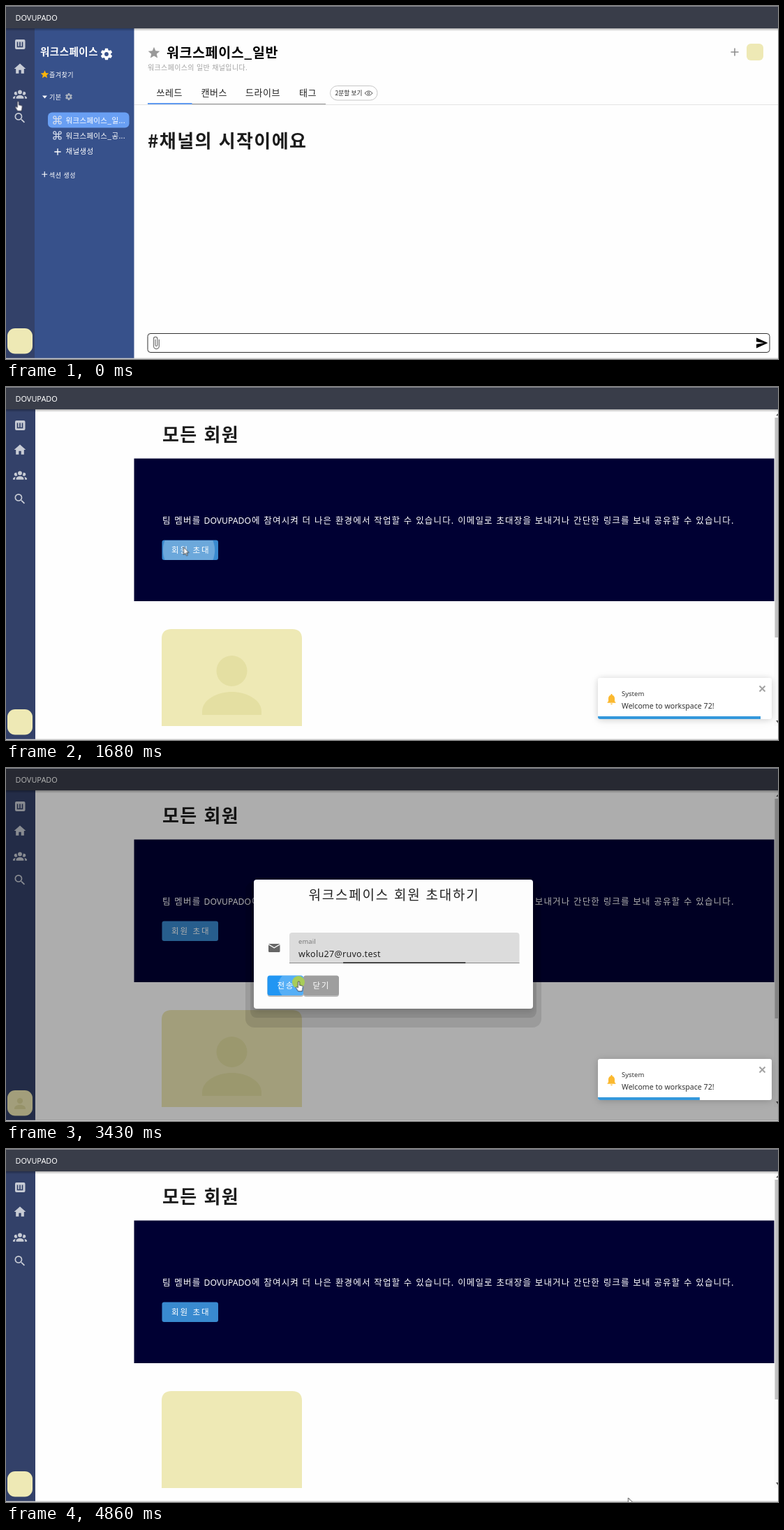
An HTML page that plays this animation: 1106x506 px, repeating every 4910 ms.

```html
<!DOCTYPE html>
<html lang="ko">
<head>
<meta charset="utf-8">
<title>Workspace invite</title>
<style>
html, body { margin: 0; width: 100%; height: 100%; overflow: hidden; background: #fff; }
#stage { position: relative; width: 1106px; height: 506px; overflow: hidden; background: #fefefe; }
#stage > * { position: absolute; }
svg { display: block; }
#stage > svg { left: 0; top: 0; }
text { font-family: "Noto Sans", "Noto Sans CJK KR", "Noto Sans CJK", sans-serif; white-space: pre; }
.ko { font-family: "Noto Sans CJK KR", "Noto Sans CJK", "Noto Sans", sans-serif; }
.b { font-weight: 700; }
.small { font-size: 9px; letter-spacing: .5px; fill: #fff; }
.channel { font-size: 10.5px; letter-spacing: .3px; fill: #fff; }
.tab { font-size: 13px; letter-spacing: .5px; fill: #222; }
.head { font-size: 26px; letter-spacing: 1.45px; fill: #1c1c1c; }
.body { font-size: 12.5px; letter-spacing: 1.16px; fill: #fff; }
.btn { font-size: 11.5px; letter-spacing: 1.6px; fill: #fff; }
#scrim { left: 0; top: 1px; width: 1106px; height: 504px; background: #000; }
#dialog {
  left: 355px; top: 160px; width: 400px; height: 185px; border-radius: 4px; background: #fdfdfd;
  box-shadow: 0 4px 8px rgba(0,0,0,.15), 0 8px 0 5px rgba(0,0,0,.1), 0 15px 0 12px rgba(0,0,0,.1);
}
#toast {
  left: 848px; top: 417px; width: 249px; height: 59px; border-radius: 3px; background: #fff; overflow: hidden;
  box-shadow: 0 1px 10px rgba(0,0,0,.14), 0 2px 15px rgba(0,0,0,.07);
}
.grow { transform-box: fill-box; transform-origin: center; }
#bar { transform-box: fill-box; transform-origin: left; }
</style>
</head>
<body>
<div id="stage">
<svg id="page" width="1106" height="506" viewBox="0 0 1106 506">
  <defs>
    <symbol id="home" viewBox="0 0 24 24"><path d="M10 20v-6h4v6h5v-8h3L12 3 2 12h3v8z"/></symbol>
    <symbol id="search" viewBox="0 0 24 24"><path d="M15.5 14h-.79l-.28-.27A6.47 6.47 0 0016 9.5 6.5 6.5 0 109.5 16c1.61 0 3.09-.59 4.23-1.57l.27.28v.79l5 4.99L20.49 19zm-6 0C7.01 14 5 11.99 5 9.5S7.01 5 9.5 5 14 7.01 14 9.5 11.99 14 9.5 14z"/></symbol>
    <symbol id="group" viewBox="0 0 24 24"><circle cx="12" cy="9" r="3.5"/><path d="M5 8c.56 0 1.08.15 1.53.42-.15 1.43.27 2.85 1.13 3.96A3 3 0 115 8m14 0a3 3 0 11-2.66 4.38 5.54 5.54 0 001.13-3.96C17.92 8.15 18.44 8 19 8M5.5 18.25c0-2.07 2.91-3.75 6.5-3.75s6.5 1.68 6.5 3.75V20h-13zM0 20v-1.5c0-1.39 1.89-2.56 4.45-2.9-.59.68-.95 1.62-.95 2.65V20zm24 0h-3.5v-1.75c0-1.03-.36-1.97-.95-2.65 2.56.34 4.45 1.51 4.45 2.9z"/></symbol>
    <symbol id="cog" viewBox="0 0 24 24"><path d="M12 15.5a3.5 3.5 0 110-7 3.5 3.5 0 010 7m7.43-2.53c.04-.32.07-.64.07-.97s-.03-.66-.07-1l2.11-1.63c.19-.15.24-.42.12-.64l-2-3.46c-.12-.22-.39-.31-.61-.22l-2.49 1c-.52-.39-1.06-.73-1.69-.98l-.37-2.65A.5.5 0 0014 2h-4c-.25 0-.46.18-.5.42l-.37 2.65c-.63.25-1.17.59-1.69.98l-2.49-1c-.22-.09-.49 0-.61.22l-2 3.46c-.13.22-.07.49.12.64L4.57 11c-.04.34-.07.67-.07 1s.03.65.07.97l-2.11 1.66c-.19.15-.25.42-.12.64l2 3.46c.12.22.39.3.61.22l2.49-1.01c.52.4 1.06.74 1.69.99l.37 2.65c.04.24.25.42.5.42h4c.25 0 .46-.18.5-.42l.37-2.65c.63-.26 1.17-.59 1.69-.99l2.49 1.01c.22.08.49 0 .61-.22l2-3.46c.12-.22.07-.49-.12-.64z"/></symbol>
    <symbol id="star" viewBox="0 0 24 24"><path d="M12 17.27L18.18 21l-1.64-7.03L22 9.24l-7.19-.61L12 2 9.19 8.63 2 9.24l5.46 4.73L5.82 21z"/></symbol>
    <symbol id="plus" viewBox="0 0 24 24"><path d="M19 13h-6v6h-2v-6H5v-2h6V5h2v6h6z"/></symbol>
    <symbol id="knot" viewBox="0 0 24 24"><path d="M9 9V6a3 3 0 10-3 3h12a3 3 0 10-3-3v12a3 3 0 103-3H6a3 3 0 103 3z" fill="none" stroke="#d3dbec" stroke-width="2"/></symbol>
    <symbol id="clip" viewBox="0 0 24 24"><path d="M16.5 6v11.5a4 4 0 01-8 0V5a2.5 2.5 0 015 0v10.5a1 1 0 01-2 0V6H10v9.5a2.5 2.5 0 005 0V5a4 4 0 00-8 0v12.5a5.5 5.5 0 0011 0V6z"/></symbol>
    <symbol id="person" viewBox="281 385 85 85"><circle cx="323.500" cy="407" r="22"/><path d="M281 470v-5c0-18 24-28 42.500-28s42.500 10 42.500 28v5z"/></symbol>
    <linearGradient id="fall" x2="0" y2="1"><stop stop-opacity=".3"/><stop offset="1" stop-opacity="0"/></linearGradient>
  </defs>

  <path d="M0 32h42v473H0z" fill="#334169"/>

  <g id="channelPage">
    <path d="M41 32h142.500v473H41z" fill="#37518b"/>
    <text class="ko b" x="49" y="71" font-size="14.500" letter-spacing=".5" fill="#fff">워크스페이스</text>
    <use href="#cog" x="134" y="59" width="20" height="20" fill="#fff"/>
    <use href="#star" x="48.500" y="91" width="14" height="14" fill="#fbb40a"/>
    <text class="ko small" x="62" y="101.500">즐겨찾기</text>
    <path d="M52 128.500h7l-3.500 4z" fill="#fff"/>
    <text class="ko small" x="62" y="133.500">기본</text>
    <use href="#cog" x="84" y="124" width="12" height="12" fill="#a9b0bd"/>
    <rect x="60" y="152.500" width="116.500" height="22" rx="6" fill="#699ff3"/>
    <use href="#knot" x="66" y="156" width="15" height="15"/>
    <use href="#knot" x="66" y="178" width="15" height="15"/>
    <text class="ko channel" x="85.500" y="167.500">워크스페이스_일...</text>
    <text class="ko channel" x="85.500" y="189.500">워크스페이스_공...</text>
    <use href="#plus" x="66" y="201" width="16" height="16" fill="#fff"/>
    <text class="ko channel" x="85.500" y="211.500">채널생성</text>
    <use href="#plus" x="48.500" y="234.500" width="13.500" height="13.500" fill="#fff"/>
    <text class="ko small" x="62" y="245.500">섹션 생성</text>

    <use href="#star" x="202" y="57" width="20" height="20" fill="#999"/>
    <text class="ko b" x="230" y="73.500" font-size="19.500" letter-spacing=".6">워크스페이스_일반</text>
    <text class="ko" x="203" y="92" font-size="10" letter-spacing=".35" fill="#a3a3a3">워크스페이스의 일반 채널입니다.</text>
    <use href="#plus" x="1034.500" y="56.500" width="19" height="19" fill="#8e8e8e"/>
    <rect x="1061" y="54" width="24" height="24" rx="6" fill="#eee9b5"/>
    <path d="M184 141.500h922" stroke="#e4e4e4"/>
    <path d="M266 140.500h192" stroke="#8d8d8d"/>
    <path d="M203 140h63.500" stroke="#5f9af0" stroke-width="2"/>
    <text class="ko tab" x="215.500" y="129">쓰레드</text>
    <text class="ko tab" x="279.500" y="129">캔버스</text>
    <text class="ko tab" x="343" y="129">드라이브</text>
    <text class="ko tab" x="420" y="129">태그</text>
    <rect x="464.500" y="114.500" width="67.500" height="20.500" rx="10.200" fill="#fff" stroke="#c6c6c6"/>
    <text class="ko" x="471.500" y="127.500" font-size="8.600" fill="#222">2분할 보기</text>
    <g fill="none" stroke="#555"><path d="M514 125q5.500-6.500 11 0q-5.500 6.500-11 0z"/><circle cx="519.500" cy="125" r="1.500"/></g>
    <text class="ko b head" x="203" y="202.500">#채널의 시작이에요</text>
    <rect x="203" y="469.500" width="891" height="27" rx="4" fill="#fff" stroke="#333"/>
    <use href="#clip" x="205" y="473" width="20" height="20" fill="#777"/>
    <path d="M1075 490.500l16.500-7.500-16.500-7.500v5.800l11 1.700-11 1.700z"/>
  </g>

  <g id="memberPage">
    <text class="ko b head" x="224" y="78">모든 회원</text>
    <path d="M183.500 102.500h923V307h-923z" fill="#000033"/>
    <text class="ko body" x="224" y="195.500">팀 멤버를</text>
    <text x="283.500" y="195.500" font-size="12.200" fill="#fff">DOVUPADO</text>
    <text class="ko body" x="352" y="195.500">에 참여시켜 더 나은 환경에서 작업할 수 있습니다. 이메일로 초대장을 보내거나 간단한 링크를 보내 공유할 수 있습니다.</text>
    <rect x="223.500" y="219.500" width="80.500" height="28.500" rx="3" fill="#398acf"/>
    <svg x="224" y="220" width="80" height="28" viewBox="224 220 80 28"><circle id="inviteRipple" class="grow" cx="262" cy="234" r="37" fill="#fff"/></svg>
    <text class="ko btn" x="237" y="238" style="letter-spacing:2px">회원 초대</text>
    <g id="members">
      <path d="M223 486V361q0-14 14-14h173q14 0 14 14v125z" fill="#eee9b5"/>
      <use id="cardPerson" href="#person" x="281" y="385" width="85" height="85" fill="#e4dfa2"/>
      <path d="M1100.500 33h6v453h-6z" fill="#fafafa"/>
      <path d="M1101.500 44h5v315h-5z" fill="#c1c1c1"/>
      <path d="M1103 41l3-3v3zM1103 478h3v4z" fill="#555"/>
    </g>
  </g>

  <g id="railIcons" fill="#c8ccd5">
    <rect x="13" y="48" width="14.500" height="14" rx="2"/>
    <path d="M16.500 51.500v7h7v-7M20 51.500v7" fill="none" stroke="#334169" stroke-width="1.700"/>
    <use href="#home" x="10" y="80" width="20" height="20"/>
    <use href="#group" x="10" y="116" width="20" height="20"/>
    <use href="#search" x="10" y="150.500" width="20" height="20"/>
  </g>
  <circle id="railRipple" class="grow" cx="20" cy="126" r="16" fill="#fff"/>
  <rect x="2" y="462" width="36" height="36.500" rx="11" fill="#eee9b5"/>
  <use id="railPerson" href="#person" x="12" y="473" width="16" height="16" fill="#ddd79a"/>
  <path d="M0 0h1106v32H0z" fill="#393d49"/>
  <path d="M0 .5h1106" stroke="#83858c"/>
  <path d="M0 32h1106v4H0z" fill="url(#fall)"/>
  <text x="13.500" y="21" font-size="10.900" font-weight="500" fill="#fff">DOVUPADO</text>
  <path d="M0 505.200h1106" stroke="#b5b5b5"/>
</svg>

<div id="scrim"></div>

<div id="dialog"><svg width="400" height="185" viewBox="355 160 400 185">
  <text class="ko" x="433.500" y="189" font-size="19" letter-spacing="1.750" fill="#222">워크스페이스 회원 초대하기</text>
  <path d="M392.500 253.500v9q0 1.500-1.500 1.500h-13.500q-1.500 0-1.500-1.500v-9l8.200 5zM376 252h16.500l-8.300 5z" fill="#666"/>
  <path d="M406 280v-40q0-4 4-4h321.500q4 0 4 4v40z" fill-opacity=".03"/>
  <path id="focusFill" d="M406 280v-40q0-4 4-4h321.500q4 0 4 4v40z" fill-opacity=".1"/>
  <path d="M406 279.500h329.500" stroke="#888"/>
  <path id="focusLine" class="grow" d="M406 278.500h329.500v1.500H406z" fill="#111"/>
  <g id="label"><text font-size="12.500" letter-spacing=".2" fill="#777">email</text></g>
  <text id="address" x="419" y="271" font-size="12.500" letter-spacing=".3" fill="#222">wkolu27@ruvo.test</text>
  <g fill-opacity=".25"><rect x="374.500" y="299" width="52" height="29" rx="4"/><rect x="426" y="299" width="51" height="29" rx="4"/></g>
  <rect x="374.500" y="297.500" width="51.500" height="28.500" rx="3.500" fill="#2196f3"/>
  <rect x="426" y="297.500" width="51" height="28.500" rx="3.500" fill="#9e9e9e"/>
  <svg x="375" y="298" width="51" height="28" viewBox="375 298 51 28"><circle id="sendRipple" class="grow" cx="410" cy="312" r="40" fill="#fff"/></svg>
  <text class="ko btn" x="388.500" y="316">전송</text>
  <text class="ko btn" x="439.500" y="316">닫기</text>
</svg></div>

<div id="toast"><svg width="249" height="59" viewBox="848 417 249 59">
  <path d="M867.500 455a1.600 1.600 0 001.600-1.300h-3.200a1.600 1.600 0 001.600 1.300zm4.500-4.500v-4c0-2.300-1.200-4.200-3.300-4.700v-.5a1.200 1.200 0 00-2.400 0v.5c-2.100.5-3.300 2.400-3.300 4.700v4l-1.500 1.500v.8h12v-.8z" fill="#fbb930"/>
  <text x="882" y="443" font-size="9.500" fill="#333">System</text>
  <text x="882" y="461" font-size="10.600" fill="#333">Welcome to workspace 72!</text>
  <path d="M1079.500 428.500l8 8m0-8l-8 8" stroke="#a3a3a3" stroke-width="2"/>
  <rect id="bar" x="848" y="472" width="249" height="4" fill="#3498db"/>
</svg></div>

<svg width="1106" height="506" viewBox="0 0 1106 506">
  <circle id="clickDot" cx="419" cy="307" r="9" fill="#a8cc58"/>
  <g id="cursor">
    <path id="arrow" d="M0 0v11l2.500-2.300 1.700 3.600 1.600-.7-1.700-3.600h3.400z" fill="#fff" stroke="#222" stroke-width=".8"/>
    <path id="hand" d="M-1.200 1c0-1.500 2.200-1.500 2.200 0v4.300l3.400.8c1.200.3 1.600 1.100 1.400 2.300l-1 5.600H-1L-4 9.300c-.6-1.100.7-2 1.600-1.200l1.200 1z" fill="#fff" stroke="#223" stroke-width=".8"/>
  </g>
</svg>
</div>

<script>
const LOOP = 4910;

// Each key is [time in ms, value, easing to the next key]; a repeated time is a hard change.
function play(id, prop, keys) {
  const first = keys[0], last = keys[keys.length - 1];
  const all = [...keys];
  if (first[0] > 0) all.unshift([0, first[1]]);
  if (last[0] < LOOP) all.push([LOOP, last[1]]);
  const frames = all.map(([t, value, easing = 'linear']) => ({ offset: t / LOOP, [prop]: value, easing }));
  document.getElementById(id).animate(frames, { duration: LOOP, iterations: Infinity });
}

// Visible between pairs of times.
function show(id, ...spans) {
  const keys = [];
  for (const [from, to] of spans) {
    if (from > 0) keys.push([from, 0]);
    keys.push([from, 1], [to, 1]);
    if (to < LOOP) keys.push([to, 0]);
  }
  play(id, 'opacity', keys);
}

const move = (x, y, k = 1) => `translate(${x}px, ${y}px) scale(${k})`;
const path = pts => pts.map(([t, x, y, ease]) => [t, move(x, y), ease]);
const OUT = 'cubic-bezier(0,0,.2,1)', IN = 'cubic-bezier(.4,0,1,1)', BOUNCE = 'cubic-bezier(.215,.61,.355,1)';

show('channelPage', [0, 655]);
show('memberPage', [655, LOOP]);
show('railIcons', [0, 655], [760, LOOP]);
show('members', [900, LOOP]);
show('cardPerson', [1100, 4835]);
show('railPerson', [1755, 4835]);

play('railRipple', 'transform', [[260, 'scale(.2)', OUT], [400, 'scale(1)']]);
play('railRipple', 'opacity', [[255, 0], [260, .18], [400, .18], [510, 0]]);
play('inviteRipple', 'transform', [[1570, 'scale(.2)'], [1680, 'scale(1)'], [1740, 'scale(1.3)']]);
play('inviteRipple', 'opacity', [[1570, 0], [1575, .27], [1830, .25], [2060, 0]]);

play('scrim', 'opacity', [[1735, 0], [1900, .32], [4550, .32, 'cubic-bezier(.4,0,.2,1)'], [4835, 0]]);
play('dialog', 'opacity', [[1735, 0, OUT], [1950, 1], [4550, 1, IN], [4675, 0]]);
play('dialog', 'transform', [[1735, 'scale(.9)', OUT], [1950, 'scale(1)'], [4550, 'scale(1)', IN], [4675, 'scale(.9)']]);
play('focusFill', 'opacity', [[2180, 0], [2260, 1], [3440, 1], [3580, 0]]);
play('focusLine', 'transform', [[2270, 'scaleX(0)', OUT], [2420, 'scaleX(1)'], [3360, 'scaleX(1)'], [3430, 'scaleX(.54)'], [3500, 'scaleX(0)']]);
play('label', 'transform', [[2270, move(419, 263), OUT], [2420, move(419, 251.5, .75)]]);
show('address', [2650, LOOP]);
play('sendRipple', 'transform', [[3370, 'scale(.2)'], [3430, 'scale(.5)'], [3600, 'scale(1.2)']]);
play('sendRipple', 'opacity', [[3370, 0], [3375, .24], [3600, .24], [3850, .1], [4680, .1], [4680, 0]]);
show('clickDot', [3380, 3530]);

play('toast', 'transform', [
  [900, move(3000, 0), BOUNCE], [1350, move(-25, 0), BOUNCE], [1460, move(10, 0), BOUNCE],
  [1570, move(-5, 0), BOUNCE], [1650, move(0, 0)]]);
play('toast', 'opacity', [[900, 0], [900, 1], [3960, 1], [4100, 0]]);
play('bar', 'transform', [[1360, 'scaleX(1)'], [4100, 'scaleX(.452)']]);

play('cursor', 'transform', path([
  [0, 17.5, 136.5], [45, 17.5, 136.5], [45, 17.5, 135.5], [1080, 17.5, 135.5, 'ease-in'],
  [1230, 153, 167, 'ease-out'], [1450, 254, 229.5], [1700, 254.5, 229.5], [1830, 257.5, 231, 'ease-in-out'],
  [2200, 530, 262], [2860, 530, 262, 'ease-in-out'], [3320, 419.5, 306], [3520, 419.5, 306, 'ease-in-out'],
  [3930, 586, 377.5], [4640, 586, 377.5], [4760, 706, 441, 'ease-out'], [4860, 891.5, 500]]));
show('hand', [0, 1120], [3220, 3600]);
show('arrow', [1120, 3220], [3600, LOOP]);
</script>
</body>
</html>
```
